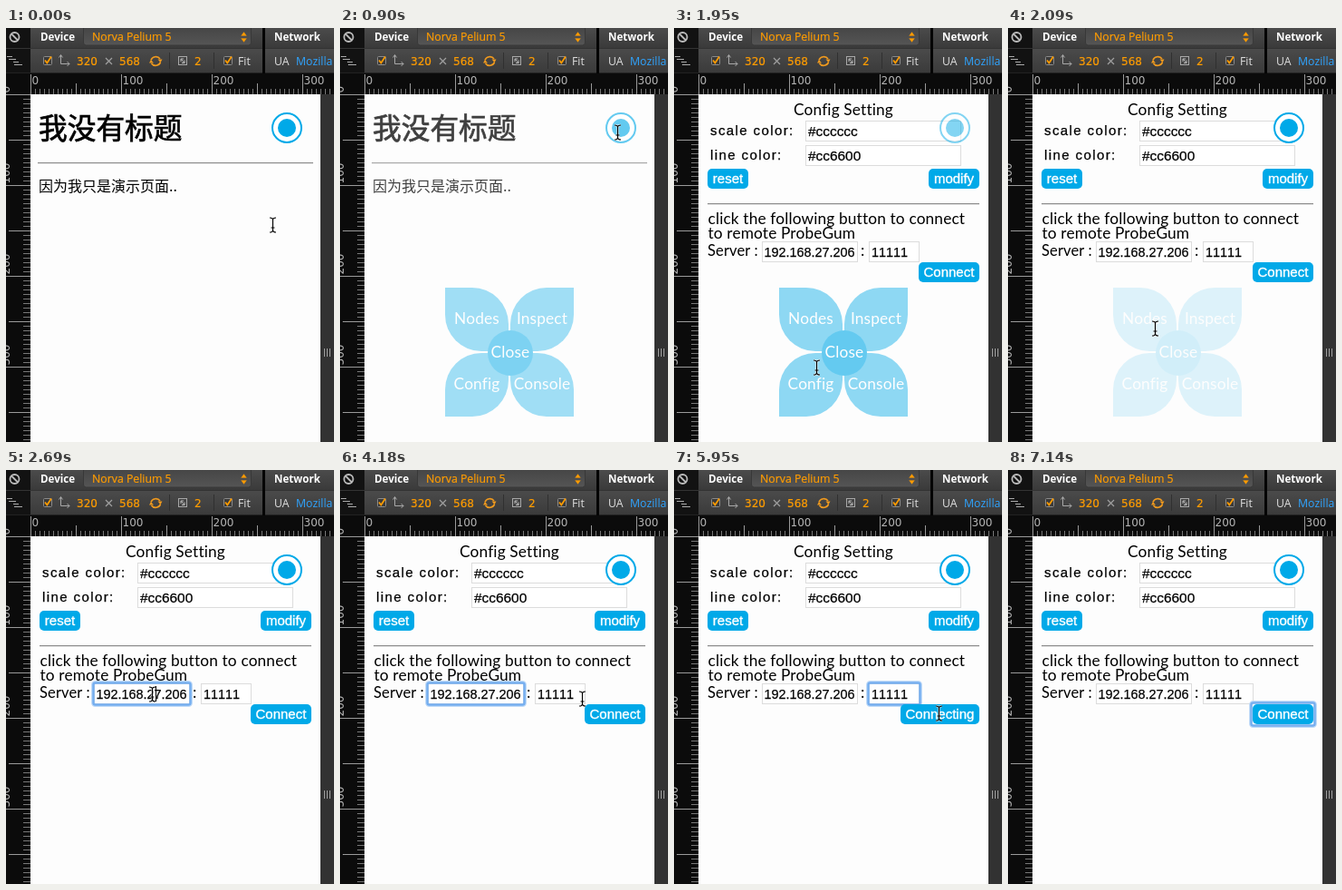
These frames come from a looping animation (362x456 px, 7340 ms). An HTML page:

```html
<!DOCTYPE html>
<html lang="en">
<head>
<meta charset="utf-8">
<title>Remote debug panel</title>
<style>
  html, body { margin: 0; width: 100%; height: 100%; overflow: hidden; background: #000; }
  svg { display: block; width: 362px; height: 456px; }
  text { white-space: pre; }
  .ui { font: 12.3px "Open Sans", "Noto Sans", sans-serif; fill: #e0e0e0; }
  .bold { font-weight: 700; font-size: 11.6px; fill: #fff; }
  .num { font: 12px "DejaVu Sans", sans-serif; }
  .orange { fill: #ff9c00; stroke: #ff9c00; stroke-width: .2px; }
  .rule { font: 12px "DejaVu Sans", sans-serif; fill: #b4b4b4; }
  .cjk { font-family: "Noto Sans CJK SC", "Noto Sans CJK", sans-serif; fill: #000; }
  .geo { font: 17.3px Lato, sans-serif; letter-spacing: .15px; }
  .sans { font: 15px "Liberation Sans", Arial, sans-serif; stroke: #000; stroke-width: .25px; }
  .code { font-size: 15.4px; }
  .addr { font-size: 14.4px; font-kerning: none; }
  .mid { text-anchor: middle; }
  .white { fill: #fff; }
  .sans.white { stroke: #fff; stroke-width: .35px; }
  .blue { fill: #00a9e8; }
  .field { fill: #fff; stroke: #dcdcdc; }
</style>
</head>
<body>
<svg viewBox="0 0 362 456" xmlns="http://www.w3.org/2000/svg">
  <defs>
    <linearGradient id="bar" x2="0" y2="1">
      <stop offset="0" stop-color="#4b4b4b"/><stop offset="1" stop-color="#3a3a3a"/>
    </linearGradient>
    <linearGradient id="pick" x2="0" y2="1">
      <stop offset="0" stop-color="#444"/><stop offset="1" stop-color="#555"/>
    </linearGradient>
    <clipPath id="ipClip"><rect x="98" y="236" width="104" height="22"/></clipPath>
    <g id="check">
      <rect x=".5" y=".5" width="9" height="9" rx="1" fill="#3a3a3a" stroke="#8a8a8a"/>
      <path d="M2 4.5 4.3 7.5 9 .5" fill="none" stroke="#ff9c00" stroke-width="1.8"/>
    </g>
  </defs>

  <rect width="362" height="456" fill="#0b0b0b"/>
  <g id="rulers"></g>

  <!-- toolbar -->
  <rect width="27" height="50" fill="#121212"/>
  <rect x="27" width="335" height="22" fill="url(#bar)"/>
  <rect x="27" y="22" width="335" height="28" fill="url(#bar)"/>
  <path d="M0 22.5H362" stroke="#333"/>
  <path d="M0 49.5H362" stroke="#222"/>
  <path d="M284.5 0V50" stroke="#050505" stroke-width="3"/>
  <path d="M180.5 27V45M229.5 27V45" stroke="#303030"/>
  <circle cx="9.5" cy="10" r="5" fill="none" stroke="#bbb" stroke-width="1.8"/>
  <path d="M6 6.5 13 13.5" stroke="#bbb" stroke-width="1.8"/>
  <path d="M1 31.5H7M3 34.5H11M8 37.5H14M9 40.5H18" stroke="#aaa"/>
  <text class="ui bold" x="38" y="14">Device</text>
  <rect x="85.5" y="-3" width="185" height="22" rx="3" fill="url(#pick)" stroke="#383838"/>
  <text class="ui orange" x="95" y="14">Norva Pelium 5</text>
  <path class="orange" d="M259.5 8.5 262.5 4.5 265.5 8.5ZM259.5 11.5 262.5 15.5 265.5 11.5Z"/>
  <text class="ui bold" x="296" y="14">Network</text>

  <use href="#check" x="41" y="31"/>
  <path d="M60.5 30V39.5H70M58.5 32.5 60.5 29.5 62.5 32.5M67.5 37 70 39.5 67.5 42" fill="none" stroke="#a8a8a8"/>
  <text class="num orange" x="78" y="41">320</text>
  <path d="M110 33 117 40M117 33 110 40" stroke="#a0a0a0" stroke-width="1.2"/>
  <text class="num orange" x="125" y="41">568</text>
  <path d="M160 35.5A5.5 5 0 0 1 170 34M170.5 37.5A5.5 5 0 0 1 160.5 39" fill="none" stroke="#f09a1e" stroke-width="1.6"/>
  <path d="M167.5 34.5H172.5L170.5 38ZM158 38.5H163L160 35Z" fill="#f09a1e"/>
  <rect x="190.5" y="31.5" width="9" height="9" fill="none" stroke="#a8a8a8"/>
  <path d="M193 37V34H196M197 35.5V38.5H194M193 34 197 38.5" fill="none" stroke="#bbb"/>
  <text class="num orange" x="208" y="41">2</text>
  <use href="#check" x="240" y="31"/>
  <text class="ui" x="256" y="41">Fit</text>
  <text class="ui" x="296" y="41">UA</text>
  <text class="ui" x="320" y="41" style="fill:#2fa4ff">Mozilla</text>

  <!-- page -->
  <rect x="347" y="73" width="15" height="383" fill="#323232"/>
  <path d="M351.5 353V362M354.5 353V362M357.5 353V362" stroke="#a0a0a0"/>
  <rect x="27" y="73" width="320" height="383" fill="#fdfdfd"/>

  <g id="home">
    <text class="cjk" x="36" y="122" font-size="31.7" stroke="#000" stroke-width=".7">我没有标题</text>
    <path d="M35 148.5H339" stroke="#8c8c8c"/>
    <path d="M35 149.5H339" stroke="#e6e6e6"/>
    <text class="cjk" x="36" y="180" font-size="16">因为我只是演示页面..</text>
  </g>

  <g id="config">
    <text class="geo mid" x="187" y="96">Config Setting</text>
    <g class="sans" letter-spacing="1.4">
      <text x="40" y="118">scale color:</text>
      <text x="40" y="145">line color:</text>
    </g>
    <rect class="field" x="145.5" y="102.5" width="171" height="22"/>
    <rect class="field" x="145.5" y="129.5" width="171" height="22"/>
    <text class="sans code" x="148" y="119">#cccccc</text>
    <text class="sans code" x="148" y="146">#cc6600</text>
    <rect class="blue" x="37" y="155" width="45" height="22" rx="5"/>
    <text class="sans white mid" x="59.5" y="171">reset</text>
    <rect class="blue" x="281" y="155" width="56" height="22" rx="5"/>
    <text class="sans white mid" x="309" y="171">modify</text>
    <path d="M37 193.5H337" stroke="#8c8c8c"/>
    <path d="M37 194.5H337" stroke="#e2e2e2"/>
    <text class="geo" x="37.5" y="216">click the following button to connect</text>
    <text class="geo" x="37.5" y="232">to remote ProbeGum</text>
    <text class="geo" x="37" y="251" style="font-size:16.5px">Server :</text>
    <text class="geo" x="206" y="251">:</text>
    <rect class="field" x="97.5" y="235.5" width="105" height="22"/>
    <rect class="field" x="215.5" y="235.5" width="55" height="22"/>
    <g clip-path="url(#ipClip)"><text class="sans addr" x="99.5" y="252">192.168.27.206</text></g>
    <text class="sans addr" x="218" y="252">11111</text>
    <g id="glow" fill="none">
      <rect id="halo" stroke="#c3dcf8" stroke-width="3" rx="3"/>
      <rect id="ring" stroke="#76aff0" stroke-width="2.5" rx="2"/>
    </g>
    <rect id="caret" y="238" width="1" height="17"/>
    <rect id="send" class="blue" y="258" height="22" rx="5"/>
    <text id="sendText" class="sans white" y="274"></text>
  </g>

  <g id="dot">
    <circle cx="310" cy="110" r="16" fill="#fff" stroke="#00a9e8" stroke-width="2"/>
    <circle class="blue" cx="310" cy="110" r="10"/>
  </g>
  <g id="menu"></g>
  <g id="cursor" fill="none">
    <path id="beam" d="M-3.5 -8Q0 -8 0 -5.5Q0 -8 3.5 -8M0 -6V6M-3.5 8Q0 8 0 5.5Q0 8 3.5 8M-2 3H2"/>
    <use href="#beam" stroke="#fff" stroke-width="2.6" opacity=".7"/>
    <use href="#beam" stroke="#000" stroke-width="1.2"/>
  </g>
</svg>
<script>
const $ = id => document.getElementById(id);
const LOOP = 7340;

function buildRulers() {
  let minor = "", major = "", labels = "";
  for (let v = 0; v <= 385; v += 5) {
    const x = 27.5 + v, y = 73.5 + v;
    const isMajor = v % 50 === 0, isFull = v % 100 === 0;
    const top = isFull ? 22 : isMajor ? 12 : 6;
    const left = isFull ? 27 : isMajor ? 24 : 8;
    const ticks = (x < 362 ? `M${x} 73V${73 - top}` : "") + `M27 ${y}H${27 - left}`;
    if (isMajor) major += ticks; else minor += ticks;
    if (isFull) {
      labels += `<text class="rule" x="${x + 1}" y="62">${v}</text>` +
        `<text class="rule" transform="translate(4 ${y - 2}) rotate(-90)">${v}</text>`;
    }
  }
  $("rulers").innerHTML =
    `<path d="${minor}" stroke="#787878"/><path d="${major}" stroke="#9a9a9a"/>${labels}`;
}

function buildMenu() {
  const leaf = "M1 1H31A40 40 0 0 1 71 41V71H41A40 40 0 0 1 1 31Z";
  const items = [["Nodes", -1, -1], ["Inspect", 1, -1], ["Config", -1, 1], ["Console", 1, 1]];
  const label = (s, x, y) => `<text class="geo white mid" x="${x}" y="${y}">${s}</text>`;
  let leaves = "", labels = "";
  for (const [name, sx, sy] of items) {
    leaves += `<path d="${leaf}" transform="translate(187 357) scale(${sx} ${sy})"/>`;
    labels += label(name, 187 + 36 * sx, 362 + 36 * sy);
  }
  $("menu").innerHTML = `<g class="blue" opacity=".73">${leaves}</g>` + labels +
    `<circle class="blue" cx="188" cy="358" r="25"/>` + label("Close", 188, 363);
}

// pointer stops: time, x, y
const stops = [
  [0, 294, 217], [450, 299, 182], [600, 304, 138], [750, 306, 115],
  [1350, 266, 188], [1500, 190, 325], [1650, 155, 383],
  [1950, 157, 374], [2090, 162, 331], [2240, 162, 274], [2390, 161, 247],
  [3730, 184, 249], [3880, 222, 252], [4030, 253, 252], [4180, 267, 252],
  [5360, 271, 256], [5510, 279, 262], [5660, 288, 267], [5800, 292, 268],
  [6550, 303, 326], [6700, 327, 418], [6840, 340, 500]
];
const fade = [[0, 0], [900, .5], [1050, 1], [1950, .6], [2090, .17], [2240, 0]];
const blink = [[2690, 3140, 165], [3730, 4180, 165], [4320, 4770, 259], [5360, 5800, 259]];

const held = (list, t) => list.filter(k => k[0] <= t).pop();
const show = (id, on) => $(id).setAttribute("visibility", on ? "visible" : "hidden");

function box(id, x, y, width, height) {
  Object.entries({ x, y, width, height }).forEach(([k, v]) => $(id).setAttribute(k, v));
}

function focus(x, y, w, h) {
  box("halo", x - 1.5, y - 1.5, w + 3, h + 3);
  box("ring", x - .5, y - .5, w + 1, h + 1);
}

function draw(t) {
  const [, x, y] = held(stops, t);
  $("cursor").setAttribute("transform", `translate(${x + .5} ${y})`);

  const m = held(fade, t)[1], onConfig = t >= 1950;
  $("home").setAttribute("opacity", 1 - m / 2);
  $("dot").setAttribute("opacity", Math.min(1, 1.21 * (1 - m)));
  $("menu").setAttribute("opacity", m);
  $("home").style.display = onConfig ? "none" : "";
  $("config").style.display = onConfig ? "" : "none";

  show("glow", t >= 2690);
  if (t >= 6100) focus(269, 257, 69, 24);
  else if (t >= 4320) focus(215, 235, 56, 23);
  else focus(97, 235, 106, 23);

  const on = blink.find(b => t >= b[0] && t < b[1]);
  show("caret", on);
  if (on) $("caret").setAttribute("x", on[2]);

  const busy = t >= 5950 && t < 6100;
  const left = busy ? 250 : 270;
  $("send").setAttribute("x", left);
  $("send").setAttribute("width", 337 - left);
  $("sendText").setAttribute("x", left + 5.5);
  $("sendText").textContent = busy ? "Connecting" : "Connect";
}

buildRulers();
buildMenu();
const start = performance.now();
function tick() {
  draw((performance.now() - start) % LOOP);
  requestAnimationFrame(tick);
}
tick();
</script>
</body>
</html>
```
